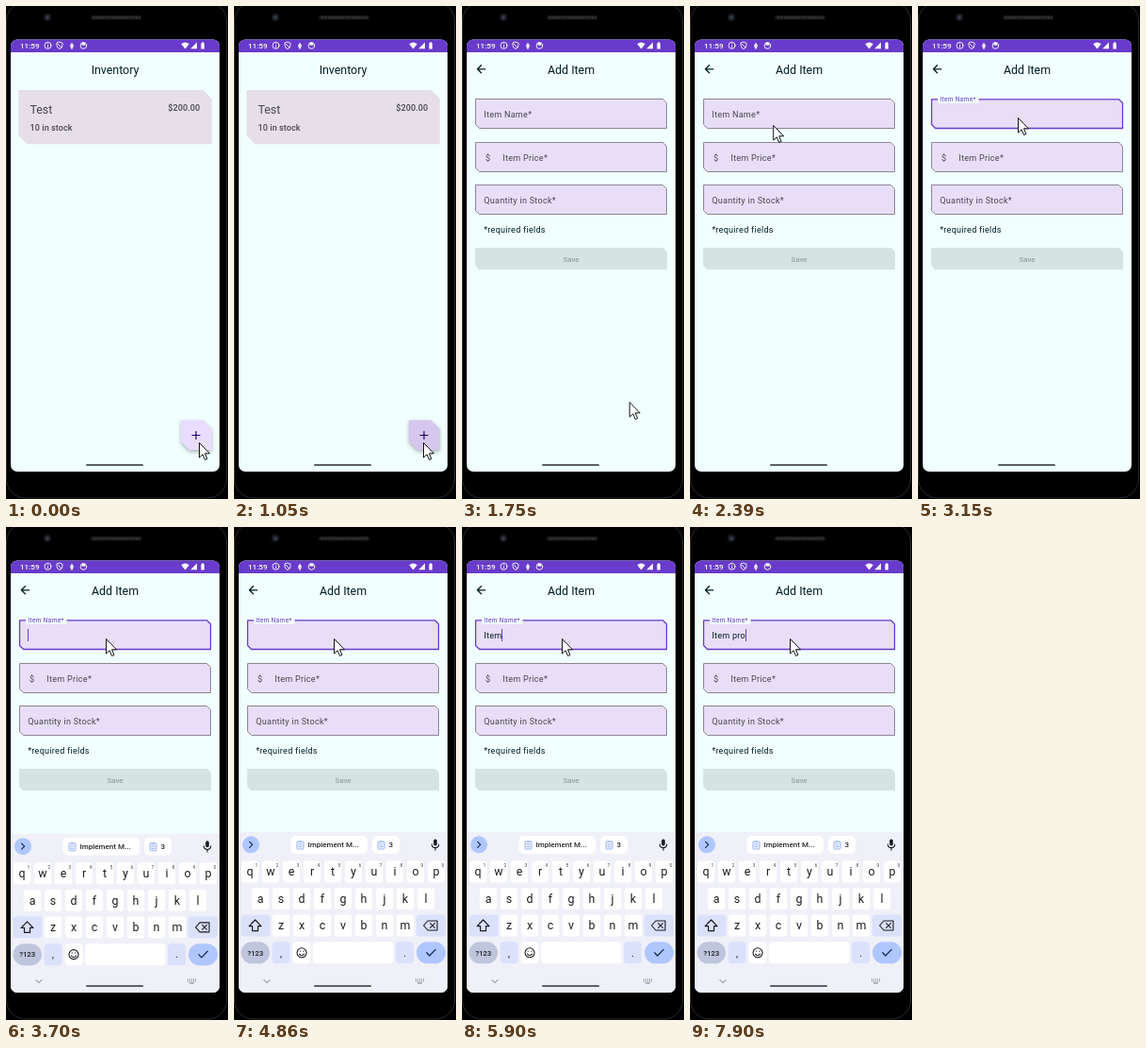
An HTML page that plays this animation: 236x522 px, repeating every 8 s.

```html
<!DOCTYPE html>
<html lang="en">
<head>
<meta charset="utf-8">
<title>Inventory app</title>
<style>
html, body { margin: 0; width: 100%; height: 100%; overflow: hidden; background: #000; }
svg { display: block; width: 236px; height: 522px; font-family: Roboto, "Open Sans", sans-serif; }
text { white-space: pre; }
.title { font-size: 12.4px; fill: #001f25; }
.body { font-size: 9.04px; letter-spacing: .28px; fill: #49454f; }
.medium { font-size: 9.04px; font-weight: 500; letter-spacing: .085px; fill: #49454f; }
.mid { text-anchor: middle; }
.line { fill: none; stroke-linecap: round; stroke-linejoin: round; }
.key { font-size: 12.4px; fill: #1b1c22; text-anchor: middle; }
.hint { font-size: 5px; fill: #44464f; text-anchor: middle; }
#fab { filter: drop-shadow(0 2px 2px rgba(0, 0, 0, .3)); }
</style>
</head>
<body>
<svg viewBox="0 0 236 522">
  <defs>
    <clipPath id="screen"><rect x="5" y="35.5" width="222" height="457.5" rx="7"/></clipPath>
  </defs>
  <rect width="236" height="522" fill="#000"/>
  <rect x="0.5" y="-4" width="234" height="525" rx="20" fill="#000" stroke="#2b2b2b"/>
  <circle cx="44" cy="12" r="4" fill="#17191f"/>
  <circle cx="44" cy="12" r="2" fill="#343a48"/>
  <rect x="90" y="10" width="54" height="4.5" rx="2.2" fill="#1c1c1c"/>
  <path d="M93 12.2H142" stroke="#343434" stroke-width="2" stroke-dasharray="2 1.2"/>

  <g clip-path="url(#screen)">
    <rect x="5" y="35" width="222" height="458" fill="#f2ffff"/>
    <g id="list"></g>
    <g id="form"></g>
    <g id="keyboard"></g>
    <g id="nav"></g>
    <rect x="85" y="485" width="61" height="2" rx="1" fill="#5c6164"/>
    <rect x="5" y="35" width="222" height="14" fill="#683bca"/>
    <g fill="#fff">
      <text x="15" y="45.2" font-size="8.1" font-weight="500">11:59</text>
      <path d="M44.1 41.4h.9v2.6h-.9zM44.1 39.6h.9v1h-.9z"/>
      <path d="M70 38.4l2 3.4-1.2 3.6h-1.6l-1.2-3.6z" opacity=".85"/>
      <path d="M186.3 40.2q4.2-3.4 8.4 0L190.5 45.4zM196.2 45.2h6.8v-6.6zM207.4 39.2h.9v-.9h1.6v.9h.9v6.2h-3.4z"/>
      <rect x="80.6" y="38.6" width="3.6" height="3"/>
    </g>
    <g class="line" stroke="#fff" stroke-width=".9">
      <circle cx="44.5" cy="41.8" r="3.5"/>
      <path d="M57 38.2l3 1.1v2.2q0 2.8-3 4-3-1.2-3-4v-2.2zM55.4 40.4l3.2 3.2"/>
      <circle cx="82.4" cy="42" r="3.3"/>
    </g>
  </g>
  <path id="cursor" d="M0 0V15.6L3.6 12.3L6 18L8.4 17L6 11.3H11Z" fill="#fff" stroke="#111" stroke-width="1" stroke-linejoin="round"/>
</svg>
<script>
const $ = id => document.getElementById(id);
const PAGE = '#f2ffff', PURPLE = '#683bca', FIELD = '#e8def8', INK = '#001f25';

const text = (x, y, cls, s, extra = '') => `<text x="${x}" y="${y}" class="${cls}" ${extra}>${s}</text>`;
const line = (d, color, width = 1) => `<path class="line" d="${d}" stroke="${color}" stroke-width="${width}"/>`;
const rect = (x, y, w, h, r, fill) => `<rect x="${x}" y="${y}" width="${w}" height="${h}" rx="${r}" fill="${fill}"/>`;
// Rectangle with its top right and bottom left corners cut off
const cut = (x, y, w, h, c) => `M${x} ${y}h${w - c}l${c} ${c}v${h - c}h${c - w}l${-c} ${-c}z`;
const field = (y, id = '') =>
  `<path ${id} d="${cut(14.5, y, 203, 31, 4)}" fill="${FIELD}" stroke="#817a88" stroke-width=".9"/>`;

$('list').innerHTML =
  text(116, 71.9, 'title mid', 'Inventory') +
  `<path d="${cut(13.3, 89, 205.5, 57.3, 9)}" fill="#e6dfe9"/>` +
  text(25.5, 114, 'title', 'Test', 'style="fill:#49454f"') +
  text(172.3, 110.6, 'medium', '$200.00') +
  text(25.5, 131.9, 'medium', '10 in stock') +
  `<path id="fab" d="${cut(186, 438.5, 32.5, 31.6, 9)}"/>` +
  line('M198 454.5h8M202 450.5v8', '#21005d', 1.2);

$('form').innerHTML =
  line('M24.6 66.8H16.6M20.4 62.8L16.4 66.8L20.4 70.8', INK, 1.3) +
  text(116, 71.9, 'title mid', 'Add Item') +
  field(98.5, 'id="name"') + field(144.5) + field(189.5) +
  `<g id="focus">
    <path d="${cut(14.5, 98.8, 203, 30.7, 4)}" class="line" stroke="${PURPLE}" stroke-width="1.3"/>
    ${rect(21, 97, 43.5, 6, 0, PAGE)}
  </g>` +
  text(23.2, 0, 'body', 'Item Name*', 'id="label"') +
  text(23.2, 118.1, 'body', '', `id="typed" style="fill:${INK}"`) +
  `<rect id="caret" y="108" width="1" height="13" fill="${PURPLE}"/>` +
  text(25, 163.5, 'body', '$') +
  text(43.3, 163.5, 'body', 'Item Price*') +
  text(23.2, 208.9, 'body', 'Quantity in Stock*') +
  text(23.2, 240.2, 'body', '*required fields', `style="fill:${INK}"`) +
  `<path d="${cut(14, 256, 204, 23, 4)}" fill="#d6e3e3"/>` +
  text(116, 270.6, 'mid', 'Save', 'font-size="7.9" font-weight="500" fill="#97a2a3"');

const key = (x, y, s) => rect(x - 9.2, y - 11.5, 18.4, 23, 3, '#fff') + text(x, y + 4.3, 'key letter', s);
const row = (letters, x, y) => [...letters].map((s, i) => key(x + i * 22, y, s)).join('');
const clip = x => `<rect x="${x}" y="333" width="7" height="8" rx="1" fill="#eaf0ff" stroke="#9db4f0"/>` +
  line(`M${x + 2} 333h3M${x + 2} 336h3M${x + 2} 338.5h3`, '#9db4f0', .9);

$('keyboard').innerHTML =
  rect(5, 323, 222, 172, 0, '#eff0f8') +
  `<circle cx="18" cy="336.3" r="9" fill="#b0c6ff"/>` +
  line('M16.6 333.3l3 3l-3 3', '#1b2a55', 1.2) +
  rect(60.5, 327, 81.5, 19, 5, '#fff') + clip(67) +
  text(78.5, 339.2, '', 'Implement M...', 'font-size="8" font-weight="500" fill="#25262c"') +
  rect(147, 327, 29, 19, 5, '#fff') + clip(153) +
  text(164.5, 339.2, '', '3', 'font-size="8" font-weight="500" fill="#25262c"') +
  rect(212.2, 330.5, 3.6, 7, 1.8, '#1b1c22') +
  line('M210.3 336q0 3.6 3.7 3.6t3.7-3.6M214 339.8v2.4', '#1b1c22', 1.1) +
  row('qwertyuiop', 17, 365) + row('asdfghjkl', 28, 393.5) + row('zxcvbnm', 50, 422) +
  [...'1234567890'].map((s, i) => text(24 + i * 22, 360, 'hint', s)).join('') +
  rect(7.5, 410.5, 31, 23, 4, '#dbe1fa') +
  line('M22.5 416l-6.4 6.6h3.4v5h6v-5h3.4z', '#1b1c22', 1.2) +
  rect(193.5, 410.5, 31.5, 23, 4, '#dbe1fa') +
  line('M206 417h10v10h-10l-4.4-5zM208.6 419.6l4.8 4.8M213.4 419.6l-4.8 4.8', '#1b1c22', 1.1) +
  rect(7.5, 439.3, 30.5, 23, 11.5, '#bfc5dc') +
  text(22.7, 453.6, 'mid', '?123', 'font-size="7.8" font-weight="500" fill="#1b1c22"') +
  rect(40.5, 439.3, 19, 23, 4, '#dbe1fa') + text(50, 454.5, 'key', ',', 'style="font-size:10px"') +
  rect(62.5, 439.3, 19, 23, 4, '#fff') +
  `<circle cx="72" cy="450.8" r="5" class="line" stroke="#1b1c22" stroke-width="1.1"/>` +
  line('M69.4 452.2q2.6 3 5.2 0M70.2 449v.2M73.8 449v.2', '#1b1c22', 1.1) +
  rect(84, 439.3, 85.5, 23, 4, '#fff') +
  rect(172, 439.3, 19, 23, 4, '#dbe1fa') + text(181.5, 454.5, 'key', '.', 'style="font-size:10px"') +
  rect(194, 439.3, 31, 23, 11.5, '#b0c6ff') +
  line('M204.8 450.8l3 3.2l6.4-6.6', '#1b2a55', 1.3);

$('nav').innerHTML =
  line('M32 479.6l3 3l3-3', '#6a6c74', 1) +
  `<path d="M193 479h9M193 481h9" stroke="#6a6c74" stroke-dasharray="1 1"/>` +
  line('M195.5 483h4', '#6a6c74', .9);

const clamp = v => Math.max(0, Math.min(1, v));
const ramp = (t, a, b) => clamp((t - a) / (b - a));
const smooth = p => p * p * (3 - 2 * p);
const mix = (a, b, p) => a + (b - a) * p;
// Latest value whose start time has passed
const latest = (steps, t) => steps.reduce((value, [at, next]) => t >= at ? next : value, steps[0][1]);

const path = [[0, 205, 462], [105, 205, 462], [125, 204, 462], [345, 204, 462], [480, 201, 462],
  [1080, 201, 462], [1500, 201, 453], [1670, 201, 453], [1750, 178, 420], [1870, 142, 310],
  [1990, 109, 190], [2110, 88, 127], [2375, 88, 127], [2600, 91, 113], [3070, 91, 113],
  [3150, 106, 118], [8000, 106, 118]];
const typing = [[0, ''], [5410, 'I'], [5640, 'It'], [5730, 'Ite'], [5900, 'Item'], [6430, 'Item '],
  [6610, 'Item p'], [6670, 'Item pr'], [7010, 'Item p'], [7160, 'Item '], [7500, 'Item p'],
  [7870, 'Item pr'], [7900, 'Item pro']];
const blink = [[0, 0], [2420, 1], [2940, 0], [3430, 1], [3880, 0], [4400, 1], [4860, 0], [5350, 1]];
const letters = [...document.querySelectorAll('.letter')].map(el => [el, el.textContent]);
let caps = false;

function draw(t) {
  const i = path.findIndex(p => p[0] > t), [t0, x0, y0] = path[i - 1], [t1, x1, y1] = path[i];
  const p = ramp(t, t0, t1);
  $('cursor').setAttribute('transform', `translate(${mix(x0, x1, p) + .5} ${mix(y0, y1, p) + .5})`);

  const fade = smooth(ramp(t, 1090, 1560));
  $('list').style.opacity = 1 - fade;
  $('form').style.opacity = fade;
  $('fab').setAttribute('fill', t < 1045 ? '#e9ddff' : '#d6c7ef');

  const lift = smooth(ramp(t, 2400, 2600)), label = $('label');
  label.setAttribute('y', mix(118.1, 101.3, lift));
  label.style.fontSize = mix(9.04, 6.78, lift) + 'px';
  label.style.letterSpacing = mix(.28, .22, lift) + 'px';
  label.style.fill = t < 2400 ? '#49454f' : PURPLE;
  $('focus').style.opacity = lift;
  $('name').style.strokeOpacity = 1 - lift;

  const typed = $('typed'), value = latest(typing, t);
  if (typed.textContent !== value) typed.textContent = value;
  $('caret').setAttribute('x', Math.round(23.2 + (value ? typed.getComputedTextLength() : 0)));
  $('caret').style.opacity = latest(blink, t);

  const shown = t >= 3430, slide = 170 * (1 - ramp(t, 3420, 3880)) ** 4.8;
  $('keyboard').style.display = $('nav').style.display = shown ? '' : 'none';
  $('keyboard').setAttribute('transform', `translate(0 ${slide})`);
  const upper = t >= 5350 && t < 5490;
  if (upper !== caps) {
    caps = upper;
    for (const [el, s] of letters) el.textContent = caps ? s.toUpperCase() : s;
  }
}

const start = performance.now();
function tick() {
  draw((performance.now() - start) % 8000);
  requestAnimationFrame(tick);
}
tick();
</script>
</body>
</html>
```
